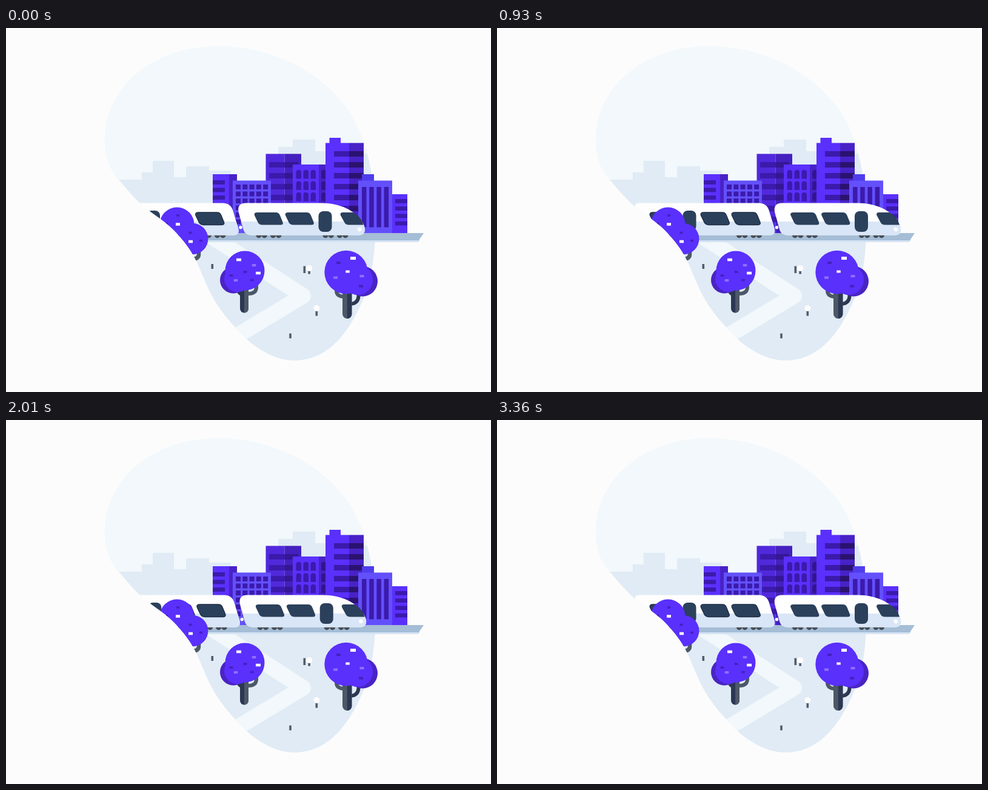
Recreate the animation shown at these times as an HTML page with a canvas. Size 800x600 px, loop 4.5 s.

```html
<!DOCTYPE html>
<html lang="en">
<head>
<meta charset="utf-8">
<title>City train</title>
<style>
html, body { margin: 0; width: 100%; height: 100%; overflow: hidden; background: #fcfcfc; }
canvas { display: block; }
</style>
</head>
<body>
<canvas width="800" height="600"></canvas>
<script>
const ctx = document.querySelector('canvas').getContext('2d');
const LOOP = 4500, STEP = 30, TRAVEL = 74.5;

const PURPLE = '#5a30fc', VIOLET = '#6350fb', SHADE = '#4822c6', WINDOW = '#3b1aac',
  MIST = '#e0ebf5', PALE = '#f2f8fb', GLASS = '#2b405b',
  BARK = '#4c5867', DARK_BARK = '#2c3852';

const blob = new Path2D(`M350 30C245 30 163 95 163 185C163 218 173 235 186 250
  C197 263 208 276 220 288C232 300 253 312 269 326C287 342 300 359 308 373
  C318 391 322 403 330 421C341 448 358 472 378 493L397 513C420 533 447 548 476 548
  C521 548 552 517 573 480C594 443 609 400 609 330C609 290 608 245 591 190
  C562 95 460 30 350 30Z`);
// The blob plus everything to its right, wound the same way so the two unite
const scene = new Path2D(blob);
scene.addPath(new Path2D('M345 0V600H800V0Z'));

const frontCar = new Path2D(`M396 288.5H520C551 288.5 576 301 587 319Q592 327 592 332
  Q592 341.5 582 341.5H405Q395 341.5 392 333L384 305Q380 288.5 396 288.5Z`);
const rearCar = new Path2D(`M160 288.5H357Q370 288.5 374 300L383 330Q386 341.5 375 341.5
  H162Q152 341.5 152 331V297Q152 288.5 160 288.5Z`);
const pane = new Path2D(`M6 0H36Q41 0 43 5L47.5 16Q49 20.5 44 20.5H14
  Q8 20.5 6 15.5L1 5Q-1 0 6 0Z`);
const windshield = new Path2D(`M556 304H573C581 308 587 316 589.5 324.5H566
  Q560 324.5 558 320L552 309Q550 304 556 304Z`);

function rect(color, x, y, w, h) {
  ctx.fillStyle = color;
  ctx.fillRect(x, y, w, h);
}

function dot(color, x, y, r) {
  ctx.fillStyle = color;
  ctx.beginPath();
  ctx.arc(x, y, r, 0, 7);
  ctx.fill();
}

function fill(color, path) {
  ctx.fillStyle = color;
  ctx.fill(path);
}

function rounded(color, x, y, w, h, r) {
  ctx.fillStyle = color;
  ctx.beginPath();
  ctx.roundRect(x, y, w, h, r);
  ctx.fill();
}

function line(color, width, d) {
  ctx.strokeStyle = color;
  ctx.lineWidth = width;
  ctx.stroke(new Path2D(d));
}

function rows(n, y, step, draw) {
  for (let i = 0; i < n; i++) draw(y + i * step);
}

function clipped(path, draw) {
  ctx.save();
  ctx.clip(path);
  draw();
  ctx.restore();
}

function backdrop() {
  fill(PALE, blob);
  clipped(blob, () => {
    const steps = [[160, 250], [224, 238], [242, 219], [277, 246], [297, 228], [335, 235],
      [371, 251], [449, 196], [473, 184], [510, 203], [560, 207], [620, 207]];
    steps.slice(0, -1).forEach(([x, y], i) => rect(MIST, x, y, steps[i + 1][0] - x, 560 - y));
    ctx.lineJoin = 'round';
    line(PALE, 26, 'M338 343L490 441.5L330 538');
  });
}

function city() {
  rect(PURPLE, 341, 241, 27, 97);
  rect(SHADE, 368, 241, 13, 97);
  rows(5, 251, 12.5, y => rect(WINDOW, 341, y, 20, 7));

  rect('#5129dc', 428.5, 207.5, 31, 131);
  rect('#4420be', 459.5, 207.5, 27.5, 131);
  rows(6, 221, 18, y => {
    rect(WINDOW, 434, y, 26, 9);
    rect('#351794', 460, y, 22, 9);
  });

  rect(VIOLET, 374, 251.5, 63, 87);
  rows(6, 258, 11.5, y => {
    for (let i = 0; i < 5; i++) rect(WINDOW, 379 + i * 11.3, y, 8, 8);
  });

  rect(PURPLE, 473, 225, 43, 113);
  rect(SHADE, 516, 225, 12, 113);
  rows(4, 234, 18.5, y => {
    for (const x of [478.5, 490.5, 502.5]) rounded(WINDOW, x, y, 8.5, 14.5, [4, 4, 0, 0]);
    rounded('#321590', 520, y, 8.5, 14.5, [4, 4, 0, 0]);
  });

  rect(PURPLE, 533.5, 181, 18.5, 9);
  rect(PURPLE, 527, 189.5, 39, 149);
  rect(SHADE, 566, 189.5, 24, 149);
  rows(7, 203, 18, y => {
    rect(WINDOW, 541, y, 25, 9);
    rect('#2a136f', 566, y, 24, 9);
  });

  rect('#4f3cec', 587, 241, 20, 12);
  rect(PURPLE, 637, 274, 25, 64);
  rows(4, 282, 12.2, y => rect(WINDOW, 642, y, 20, 6.8));
  rect(VIOLET, 581, 251.5, 56, 87);
  for (let i = 0; i < 4; i++) rect(WINDOW, 587 + i * 12.2, 262, 7.5, 66.5);
}

function track() {
  fill('#d4e3f4', new Path2D('M150 349H683L680 353H150Z'));
  fill('#a5bdd6', new Path2D('M150 338H689L681 350H150Z'));
}

function car(shape) {
  fill('#fefefe', shape);
  clipped(shape, () => rect('#d9e6f7', 140, 319, 460, 30));
}

function panes(xs, edge) {
  for (const x of xs) {
    ctx.save();
    ctx.translate(x, 304);
    fill(GLASS, pane);
    if (edge) {
      ctx.strokeStyle = '#1e2d45';
      ctx.lineWidth = 1.3;
      ctx.stroke(pane);
    }
    ctx.restore();
  }
}

function train(shift) {
  ctx.save();
  ctx.translate(shift, 0);
  for (const x of [325, 348.5, 417, 440.5, 527, 550.5]) {
    dot('#474e57', x, 341.5, 4.7);
    dot('#474e57', x + 9.3, 341.5, 4.7);
  }
  car(rearCar);
  car(frontCar);
  panes([177, 261, 312], true);
  panes([409, 460]);
  rounded(GLASS, 232, 301, 22, 34, 8);
  rounded(GLASS, 515.5, 302, 22, 34, 8);
  fill(GLASS, windshield);
  dot('#fff', 583.3, 332, 3.3);
  dot('#fff', 387, 328.8, 2.7);
  ctx.restore();
}

// shade: width of the smaller crown's dark rim, positive on the right
function crown(x, y, r, x2, y2, r2, shade) {
  dot('#4a24c4', x2, y2, r2);
  dot(PURPLE, x2 - shade, y2 - Math.abs(shade) / 3, r2);
  dot(PURPLE, x, y, r);
}

function flecks(color, w, h, spots) {
  for (const [x, y] of spots) rect(color, x - w / 2, y - h / 2, w, h);
}

function trunk(x, y, w, h, left, right) {
  rounded(left, x, y, w, h, w / 2);
  ctx.save();
  ctx.beginPath();
  ctx.rect(x + w / 2, y, w / 2, h);
  ctx.clip();
  rounded(right, x, y, w, h, w / 2);
  ctx.restore();
}

function trees() {
  const dim = '#4420c0', lit = '#8f70ff';

  line(BARK, 6.5, 'M318 364V373Q318 381 306 381');
  crown(282, 324, 28.5, 307.7, 347.5, 25.5, 0);
  flecks(dim, 5, 3.5, [[283.5, 309], [265, 323], [304, 337.5], [321.5, 350.5]]);
  flecks('#fff', 7, 4.5, [[283.5, 323.5], [304.5, 352]]);

  line(BARK, 6, 'M413 418V427Q413 438 399 438');
  line(DARK_BARK, 6, 'M383 428Q383 438 390 439');
  trunk(386, 415, 14, 54.5, DARK_BARK, BARK);
  crown(394, 400, 32.5, 375, 415.5, 22, -7);
  flecks('#fff', 8, 4.5, [[384, 382], [416, 404]]);
  flecks(lit, 6.5, 4, [[409, 391], [379, 416]]);
  flecks(dim, 6, 3.5, [[394.5, 402], [371.5, 408], [406, 415.5]]);

  line(DARK_BARK, 6, 'M581.5 434V442Q581 454 568 455');
  line(BARK, 6, 'M545 433Q545 442 557 443');
  trunk(555, 420, 15.5, 59, BARK, DARK_BARK);
  crown(561, 402.5, 35.7, 588, 417.5, 25, 8);
  flecks('#fff', 9, 5, [[572.5, 379.5]]);
  flecks('#fff', 6.5, 4, [[563.5, 401.5]]);
  flecks(dim, 7, 4, [[548.5, 387], [585.5, 425.5]]);
  flecks(lit, 7, 4, [[543.5, 411.5], [587, 409]]);
}

function posts() {
  for (const [x, y, h] of [[338.5, 389, 8], [490.5, 392.5, 11.5], [498.3, 399, 6.5],
    [510.5, 465, 9.5], [467.2, 503.5, 8]]) rect('#525d6a', x, y, 3.6, h);
  dot('#fdfdfd', 500.3, 396, 5);
  dot('#fdfdfd', 512.5, 462, 5);
}

// cubic-bezier(1/3, 0, 0, 1)
function ease(u) {
  let lo = 0, hi = 1;
  for (let i = 0; i < 30; i++) {
    const s = (lo + hi) / 2;
    if (s - 2 * s * s + 2 * s ** 3 < u) lo = s; else hi = s;
  }
  return lo * lo * (3 - 2 * lo);
}

function trainShift(t) {
  if (t < 960) return TRAVEL * ease(t / 960);
  if (t < 2400) return TRAVEL * (1 - ease((t - 960) / 1440));
  return TRAVEL * ease(Math.min(1, (t - 2400) / 960));
}

function frame(now) {
  const t = Math.floor(now % LOOP / STEP) * STEP;
  rect('#fcfcfc', 0, 0, 800, 600);
  backdrop();
  clipped(scene, () => {
    city();
    track();
    train(trainShift(t));
    posts();
    trees();
  });
  requestAnimationFrame(frame);
}
frame(0);
</script>
</body>
</html>
```
